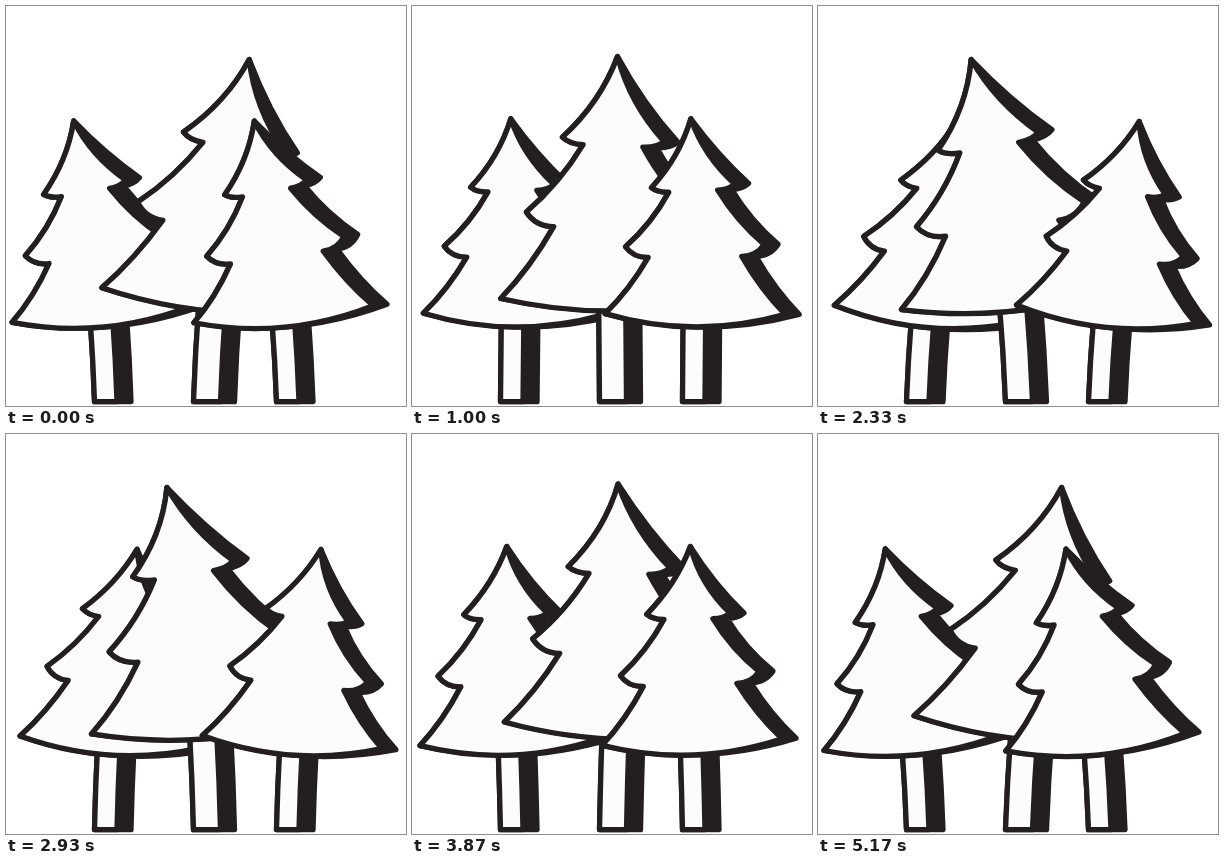
Recreate the animation shown at these times as an HTML page. Size 400 by 400 pixels, loop 5.21 s.

```html
<!DOCTYPE html>
<html lang="en">
<head>
<meta charset="utf-8">
<title>Swaying pines</title>
<style>
  html, body { margin: 0; width: 100%; height: 100%; overflow: hidden; background: #fff; }
  svg { display: block; width: 100vw; height: 100vh; }
  path { stroke: #231f20; stroke-width: 5.3; stroke-linejoin: round; }
  .shade { fill: #231f20; }
  .front { fill: #fcfcfc; }
</style>
</head>
<body>
<svg id="stage" viewBox="0 0 400 400"></svg>
<script>
const LOOP = 5210, GROUND = 395.6, BEND = 1.6, DEPTH = 14, SAG = 26;
const LEAD = 0.6, LAG = 0.39; // phase at the ground, and how far the top trails it

// Key points of every crown, in half widths and heights.
const tips = [[0.462, 0.344], [0.77, 0.65], [1, 1]];
const notches = [[0.272, 0.371], [0.52, 0.708]];

// Back to front; tilt moves the top off the axis.
const small = { apex: 112.5, foot: 308, width: 90, tilt: 2, trunk: 10.5 };
const trees = [
  { ...small, axis: 100.5, sway: -36, lead: 0.05 },
  { apex: 50, foot: 292, width: 110, tilt: -1, trunk: 15, axis: 199.5, sway: 45.7, lead: 0 },
  { ...small, axis: 282.5, sway: -37, lead: 0 }
];

const mix = (a, b, k) => a + (b - a) * k;

// One side of a crown, top down: alternating curve controls and corners.
function crownSide({ apex, foot, width }) {
  const points = [];
  let from = [0, 0];
  tips.forEach((tip, i) => {
    points.push([mix(from[0], tip[0], 0.5) - 0.1 / (i + 1), mix(from[1], tip[1], 0.5) + 0.02], tip);
    from = notches[i];
    if (from) points.push([mix(tip[0], from[0], 0.35), from[1]], from);
  });
  return points.map(([u, v]) => [u * width, mix(apex, foot, v)]);
}

// Bends a tree sideways in a wave that travels upwards, keeping its length.
function makeBend({ axis, apex, sway, lead }, turn) {
  const height = GROUND - apex;
  return ([u, y]) => {
    const t = Math.max(0, (GROUND - y) / height);
    const phase = turn + LEAD + lead - LAG * t;
    const reach = sway * t ** BEND;
    const angle = sway * t ** (BEND - 1) / height *
      (BEND * Math.cos(phase) + LAG * t * Math.sin(phase));
    const drop = angle * angle * t * height / (4 * BEND - 2);
    const x = axis + reach * Math.cos(phase) + u * Math.cos(angle);
    return x.toFixed(2) + " " + (y + drop + u * Math.sin(angle)).toFixed(2);
  };
}

function crownPath(tree, bend, depth) {
  const side = crownSide(tree);
  const top = [tree.tilt, tree.apex];
  const left = side.map(([u, y]) => [-u, y]);
  const right = side.map(([u, y]) => [u + depth, y]).reverse();
  const points = [top, ...left, [depth / 2, tree.foot + SAG], ...right, top].map(bend);
  let d = "M" + points[0];
  for (let i = 1; i < points.length; i += 2) d += "Q" + points[i] + " " + points[i + 1];
  return d + "Z";
}

function trunkPath({ foot, trunk }, bend, depth) {
  const top = foot + 5, middle = (top + GROUND) / 2;
  const edge = u => [top, middle, GROUND].map(y => bend([u, y]));
  const [a, b, c] = edge(-12);
  const [e, f, g] = edge(trunk + depth);
  return `M${a}Q${b} ${c}L${g}Q${f} ${e}Z`;
}

const stage = document.getElementById("stage");

function addPath(className) {
  const path = document.createElementNS("http://www.w3.org/2000/svg", "path");
  path.setAttribute("class", className);
  return stage.appendChild(path);
}

const layers = [trunkPath, crownPath].flatMap(outline => [
  { outline, depth: DEPTH, className: "shade" },
  { outline, depth: 0, className: "front" }
]);
const parts = trees.flatMap(tree =>
  layers.map(layer => ({ tree, ...layer, path: addPath(layer.className) })));

function draw(time) {
  const turn = 2 * Math.PI * (time % LOOP) / LOOP;
  for (const { tree, outline, depth, path } of parts) {
    path.setAttribute("d", outline(tree, makeBend(tree, turn), depth));
  }
}

const start = performance.now();
function tick() {
  draw(performance.now() - start);
  requestAnimationFrame(tick);
}
tick();
</script>
</body>
</html>
```
